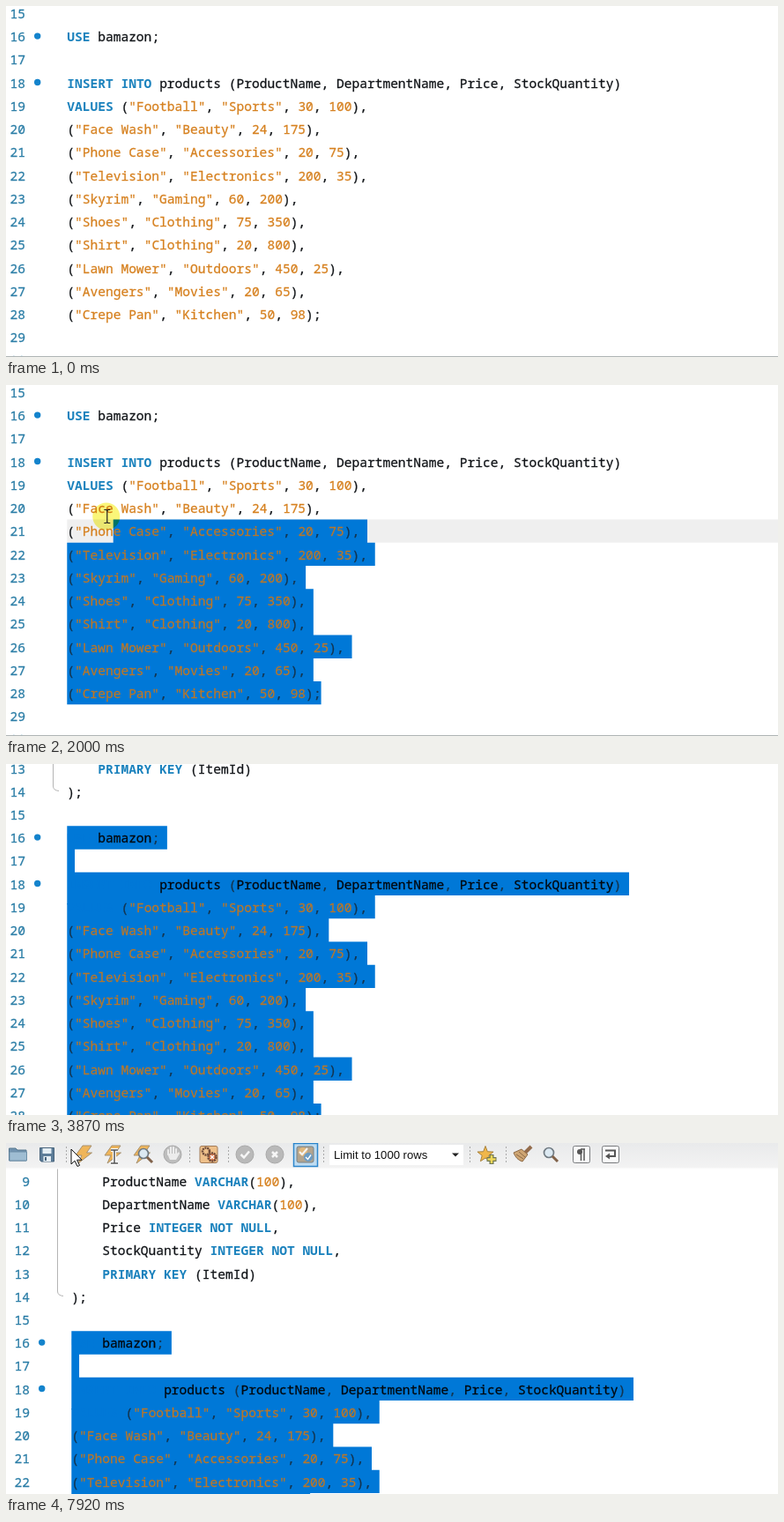
Animation of 876 by 398 pixels, one loop 8000 ms. Source, as an HTML page:

```html
<!DOCTYPE html>
<html lang="en">
<head>
<meta charset="utf-8">
<title>SQL editor</title>
<style>
html, body { margin: 0; width: 100%; height: 100%; overflow: hidden; background: #fff; }
svg { display: block; width: 876px; height: 398px; }
.code text { font: 14.56px "Noto Sans Mono", "DejaVu Sans Mono", monospace; white-space: pre; stroke-width: .28px; }
.num { fill: #2a7da6; stroke: #2a7da6; }
.kw { fill: #1b82bd; font-weight: 700; }
.str { fill: #d6801f; stroke: #d6801f; }
.id, .punct { fill: #111418; stroke: #111418; }
.picked .id { fill: #03080e; stroke: #03080e; }
.picked .punct { fill: #14344e; stroke: #14344e; }
.picked .str { fill: #b9772a; stroke: #b9772a; }
.picked .kw { fill: #0078d7; }
.limit { font: 13.1px "Liberation Sans", Arial, sans-serif; fill: #111; }
</style>
</head>
<body>
<svg viewBox="0 0 876 398">
  <defs>
    <clipPath id="clip"><path id="clipPath"/></clipPath>
    <linearGradient id="barFill" x2="0" y2="1"><stop stop-color="#e9eaeb"/><stop offset="1" stop-color="#f3f3f3"/></linearGradient>
    <path id="bolt" d="M87 3H97L91.500 11H97.500L82 23L86 14H79Z" fill="#efb55a" stroke="#a08c6c" stroke-width=".9"/>
    <g id="lens" fill="none"><circle r="5.5" fill="#dce9f2" stroke="#707a82" stroke-width="1.7"/><path d="M4 4L10 10" stroke="#80624a" stroke-width="3"/></g>
  </defs>
  <rect width="876" height="398" fill="#fff"/>
  <g id="editor" class="code">
    <rect id="current" x="69.3" width="807" height="26.23" fill="#efefef"/>
    <path d="M53.5 -200V-24Q53.500 -19 60 -18.500" fill="none" stroke="#b4b4b4"/>
    <g id="plain"></g>
    <path id="selection" fill="#0078d7"/>
    <g clip-path="url(#clip)"><g id="picked" class="picked"></g></g>
    <g id="gutter"></g>
  </g>
  <path id="edge" d="M0 397.5H876" stroke="#aeb4b4"/>
  <g id="bar">
    <rect width="876" height="29" fill="url(#barFill)"/>
    <rect y="28" width="876" height="1.5" fill="#fafafa"/>
    <g id="folder">
      <path d="M3.5 20V6H11L13 8H23V20Z" fill="#7193b0" stroke="#58788f"/>
      <path d="M4 20V10H23.500V20Z" fill="#9fbdd3" stroke="#6d8ea7"/>
    </g>
    <g id="disk">
      <path d="M38.500 5.500H54.500V21H40L38.500 19.500Z" fill="#5c7c98" stroke="#48647c"/>
      <path d="M41.500 6H51.500V12H41.500ZM42.500 15H51V21H42.500Z" fill="#e4edf3"/>
      <path d="M44 16H46V20H44Z" fill="#48647c"/>
    </g>
    <g id="marks" stroke="#a9a9a9" stroke-dasharray="2 2"></g>
    <rect id="hover" y=".5" width="27" height="27" fill="#b9dcf4" stroke="#3c96d8"/>
    <use href="#bolt"/>
    <use href="#bolt" x="33"/>
    <path d="M119 8H127M123 8V23M119 23H127" stroke="#fff" stroke-width="4"/>
    <path d="M119 8H127M123 8V23M119 23H127" stroke="#555" stroke-width="1.5"/>
    <use href="#bolt" x="66"/>
    <use href="#lens" x="156" y="12"/>
    <g fill="#b7b7b7" stroke="#a9a9a9">
      <circle cx="189" cy="13" r="10" fill="#bdbdbd"/>
      <path d="M184 13V8M187 12V5M190 12V5M193 13V7" stroke="#ececec" stroke-width="2" stroke-linecap="round"/>
      <path d="M183 12H194L196 10L197 12L193 19H186Z" fill="#ececec" stroke="none"/>
    </g>
    <rect x="220" y="3.500" width="20" height="19" rx="2" fill="#eec08a" stroke="#a07a58"/>
    <g fill="none" stroke="#6d4a3a" stroke-width="2.5">
      <circle cx="227" cy="9.500" r="4" stroke-dasharray="2 .8"/>
      <circle cx="234" cy="16" r="4.500" fill="#d9784a" stroke-dasharray="2 .8"/>
    </g>
    <path d="M232 14L236 18M236 14L232 18" stroke="#fff" stroke-width="1.300"/>
    <g fill="#b9b9b9" stroke="#a9a9a9"><circle cx="271" cy="13" r="10"/><circle cx="305" cy="13" r="10"/></g>
    <path d="M266.500 13L270 16.500L276 9.500M302 10L308 16M308 10L302 16" fill="none" stroke="#f6f6f6" stroke-width="2.500"/>
    <rect x="326.500" y=".5" width="27" height="26" fill="#bfdcf1" stroke="#2d86cc" stroke-width="1.500"/>
    <rect x="330" y="4" width="19" height="18" rx="2" fill="#b3a48e" stroke="#77838a"/>
    <circle cx="337" cy="10" r="5" fill="#e0b87e"/>
    <path d="M333 10L336 13L342 6" fill="none" stroke="#f5f5f5" stroke-width="2"/>
    <circle cx="343" cy="16" r="5" fill="#6b9cc4"/>
    <path d="M340 16L342.500 18.500L346 13.500" fill="none" stroke="#fff" stroke-width="1.400"/>
    <rect x="367" y="2" width="152" height="23" fill="#fff"/>
    <text class="limit" x="372" y="18">Limit to 1000 rows</text>
    <path d="M506 11.500H514L510 15.500Z" fill="#222"/>
    <path id="star" fill="#f0b74b" stroke="#a9833f"/>
    <path d="M551 13V24M545.500 18.500H556.500" stroke="#6f7650" stroke-width="5"/>
    <path d="M551 14V23M546.500 18.500H555.500" stroke="#f1d858" stroke-width="2.500"/>
    <path d="M596 4L588 12" stroke="#946c4c" stroke-width="4"/>
    <path d="M576 11L585 7L592 13L586 21Q579 19 576 11Z" fill="#cfa673" stroke="#8c6946"/>
    <path d="M579 13L587 18M582 10L589 16" stroke="#8c6946"/>
    <use href="#lens" x="616" y="11"/>
    <g fill="#fafafa" stroke="#77797c"><rect x="643.500" y="3.500" width="19" height="19" rx="2"/><rect x="676.500" y="3.500" width="19" height="19" rx="2"/></g>
    <path d="M652 7H657M652.500 7V20M656 7V20" stroke="#555" stroke-width="1.500"/>
    <circle cx="651" cy="10" r="3" fill="#555"/>
    <path d="M680 8.500H691V15H683" fill="none" stroke="#555" stroke-width="2"/>
    <path d="M680 15L685 11.500V18.500Z" fill="#555"/>
  </g>
  <g id="beam">
    <circle cx="-1" r="15.500" fill="#faf679" style="mix-blend-mode:multiply"/>
    <path d="M-3.500 -7.500H-1L0 -6.500L1 -7.500H3.500M0 -6.500V6.500M-3.500 7.500H-1L0 6.500L1 7.500H3.500" fill="none" stroke="#222" stroke-width="1.200"/>
  </g>
  <path id="arrow" d="M0 0V17L4 13.200L7 19.500L9.500 18.400L6.600 12.200H12Z" fill="#fff" stroke="#111"/>
</svg>
<script>
const $ = id => document.getElementById(id);
const LOOP = 8000, CW = 8.736, RH = 26.23, LEFT = 69.3, TOP = 21.3, FIRST = 9, LAST = 28;
const SCROLL = 3870, TOOLBAR = 4570, PRESS = 366, LAG = 78;

const lines = `    ProductName VARCHAR(100),
    DepartmentName VARCHAR(100),
    Price INTEGER NOT NULL,
    StockQuantity INTEGER NOT NULL,
    PRIMARY KEY (ItemId)
);

USE bamazon;

INSERT INTO products (ProductName, DepartmentName, Price, StockQuantity)
VALUES ("Football", "Sports", 30, 100),
("Face Wash", "Beauty", 24, 175),
("Phone Case", "Accessories", 20, 75),
("Television", "Electronics", 200, 35),
("Skyrim", "Gaming", 60, 200),
("Shoes", "Clothing", 75, 350),
("Shirt", "Clothing", 20, 800),
("Lawn Mower", "Outdoors", 450, 25),
("Avengers", "Movies", 20, 65),
("Crepe Pan", "Kitchen", 50, 98);

`.split("\n");

const rowTop = n => TOP + (n - 16) * RH;
const baseline = n => rowTop(n) + 18.9;
const lineLength = n => lines[n - FIRST].length;

const KEYWORD = /^(USE|INSERT|INTO|VALUES|VARCHAR|INTEGER|NOT|NULL|PRIMARY|KEY)$/;
function kind(word) {
  if (/^["\d]/.test(word)) return "str";
  if (KEYWORD.test(word)) return "kw";
  return /^\w/.test(word) ? "id" : "punct";
}

function codeLine(text, n) {
  let out = "";
  for (const m of text.matchAll(/"[^"]*"|\w+|[^\w\s"]+/g))
    out += `<tspan class="${kind(m[0])}" x="${LEFT + m.index * CW}">${m[0]}</tspan>`;
  return `<text y="${baseline(n)}">${out}</text>`;
}

function build() {
  const code = lines.map((s, i) => codeLine(s, FIRST + i)).join("");
  $("plain").innerHTML = $("picked").innerHTML = code;
  $("gutter").innerHTML = lines.map((s, i) => {
    const n = FIRST + i;
    return `<text class="num" x="${n < 10 ? 4.6 + CW : 4.6}" y="${baseline(n)}">${n}</text>`;
  }).join("") + [16, 18].map(n =>
    `<circle cx="35.7" cy="${rowTop(n) + 12.8}" r="3.7" fill="#1483cc"/>`).join("");
  $("marks").innerHTML = [68, 208, 252, 360, 526, 567]
    .map(x => `<path d="M${x}.5 4V24"/>`).join("");
  let star = "";
  for (let i = 0; i < 10; i++) {
    const r = i % 2 ? 4 : 9.5, a = i * Math.PI / 5;
    star += `${i ? "L" : "M"}${544 + r * Math.sin(a)} ${13 - r * Math.cos(a)}`;
  }
  $("star").setAttribute("d", star + "Z");
}

// Bursts of movement: start, end, number of steps
const bursts = [[130, 760, 9], [990, 1600, 9], [1770, 2390, 9], [2530, 3090, 8],
  [3320, 3490, 3], [7000, 7770, 11], [7840, 7920, 2]];

function snap(t) {
  let q = 0;
  for (const [a, b, n] of bursts) {
    if (t < a) break;
    const d = (b - a) / (n - 1);
    q = a + Math.min(n - 1, Math.floor((t - a) / d + 1e-6)) * d;
  }
  return q;
}

// Time, x, y
const beamPath = [[130, 560, 362], [288, 385, 353], [366, 358, 350], [760, 86, 347],
  [990, 100, 336], [1371, 167, 225], [1447, 164, 201], [1600, 140, 182],
  [1770, 130, 172], [2390, 69, 80], [2530, 64, 64], [2610, 59, 47.4],
  [2690, 56, 47], [2850, 50, 34], [3090, 54, 36], [3320, 85, 16],
  [3405, 125, -4], [3490, 140, -50]];
const arrowPath = [[7000, 111.5, 4.5], [7300, 116, 12], [7770, 84, 9], [7840, 78, 8], [7920, 74, 7]];

function at(path, t) {
  const i = path.findIndex(p => p[0] >= t);
  if (i < 0) return path[path.length - 1].slice(1);
  if (i === 0) return path[0].slice(1);
  const [a, x, y] = path[i - 1], [b, u, v] = path[i];
  const k = (t - a) / (b - a);
  return [x + (u - x) * k, y + (v - y) * k];
}

// The selection trails the pointer by one step
function caret(q) {
  const t = Math.min(q - LAG, 2900);
  if (t < PRESS) return null;
  const [x, y] = at(beamPath, t);
  const row = Math.max(16, Math.min(LAST, 16 + Math.floor((y - TOP) / RH)));
  const col = Math.max(0, Math.min(lineLength(row), Math.round((x - LEFT) / CW)));
  return { row, col };
}

function selectionPath(from) {
  let d = "";
  for (let n = from.row; n <= LAST; n++) {
    const x = LEFT + (n === from.row ? from.col * CW : 0);
    const end = LEFT + (lineLength(n) + (n < LAST ? 1 : 0)) * CW;
    d += `M${x} ${rowTop(n)}H${end}V${rowTop(n + 1) + (n < LAST ? 0.1 : 0)}H${x}Z`;
  }
  return d;
}

const show = (id, on) => $(id).setAttribute("display", on ? "inline" : "none");
const move = (id, x, y) => $(id).setAttribute("transform", `translate(${x} ${y})`);

function draw(t) {
  const q = snap(t), tools = t >= TOOLBAR, scrolled = t >= SCROLL;
  move("editor", tools ? 5 : 0, tools ? 192 : scrolled ? 49 : 0);
  show("bar", tools);
  show("edge", !scrolled);

  const from = caret(q), d = from ? selectionPath(from) : "";
  $("selection").setAttribute("d", d);
  $("clipPath").setAttribute("d", d);
  show("current", from && !scrolled);
  if (from) $("current").setAttribute("y", rowTop(from.row));

  show("beam", q >= 130 && q < 3490);
  move("beam", ...at(beamPath, q));

  const [x, y] = at(arrowPath, q);
  show("arrow", q >= 7000);
  move("arrow", x, y);
  show("hover", q >= 7000 && x > 75);
  $("hover").setAttribute("x", x > 107 ? 108.5 : 75.5);
}

function tick() {
  draw(performance.now() % LOOP);
  requestAnimationFrame(tick);
}

build();
tick();
</script>
</body>
</html>
```
